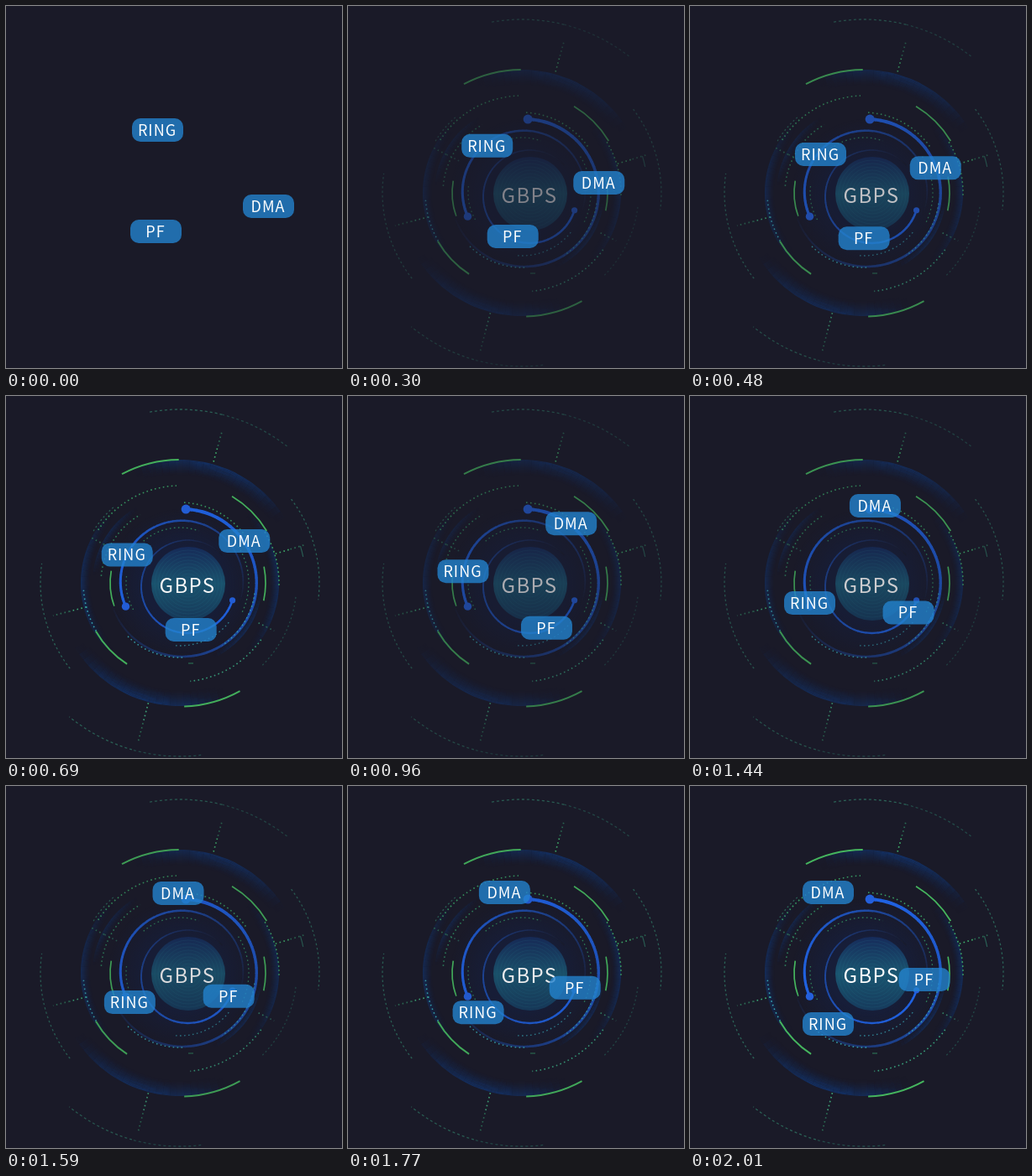
These frames come from a looping animation (400 by 432 pixels, 2.67 s). An HTML page:

```html
<!DOCTYPE html>
<html lang="en">
<head>
<meta charset="utf-8">
<title>GBPS dial</title>
<style>
  html, body { margin: 0; width: 100%; height: 100%; overflow: hidden; background: #1a1a28; }
  body { position: relative; font-family: "Noto Sans CJK SC", "Noto Sans CJK JP", "Noto Sans CJK", "Noto Sans", sans-serif; }

  #dial {
    position: absolute; left: 0; top: 0; width: 400px; height: 432px;
    animation: pulse 2670ms infinite;
  }
  .chip {
    position: absolute; left: 0; top: 0; width: 61px; height: 28px;
    border-radius: 10px; background: rgba(35, 131, 205, .8);
    color: #fff; font-size: 18px; line-height: 27px; letter-spacing: 1px; text-indent: -1px;
    text-align: center; white-space: nowrap;
    offset-rotate: 0deg; offset-anchor: 50% 50%;
    animation: travel 2670ms infinite;
  }

  /* Everything advances in 30 ms steps, then rests until the loop restarts. */
  @keyframes pulse {
    0% { opacity: 0; animation-timing-function: steps(22); }
    24.719% { opacity: 1; animation-timing-function: steps(11); }
    37.079% { opacity: .6; animation-timing-function: steps(33); }
    74.157%, 100% { opacity: 1; }
  }
  @keyframes travel {
    0% { offset-distance: 0%; animation-timing-function: steps(66); }
    74.157%, 100% { offset-distance: 100%; }
  }
</style>
</head>
<body>
<svg id="dial" viewBox="0 0 400 432">
  <defs>
    <radialGradient id="halo" gradientUnits="userSpaceOnUse" cx="211" cy="224" r="90">
      <stop offset=".5" stop-color="#14224a" stop-opacity=".5"/>
      <stop offset="1" stop-color="#14224a" stop-opacity="0"/>
    </radialGradient>
    <linearGradient id="core" x1="0" y1="0" x2="0" y2="1">
      <stop offset="0" stop-color="#162b5a"/>
      <stop offset=".5" stop-color="#1a5570"/>
      <stop offset="1" stop-color="#163a5c"/>
    </linearGradient>
  </defs>
</svg>
<div class="chip" id="ring">RING</div>
<div class="chip" id="dma">DMA</div>
<div class="chip" id="pf">PF</div>

<script>
const dial = document.getElementById('dial');
const CX = 207, CY = 223;
const BG = [26, 26, 40];

function add(tag, attrs) {
  const el = document.createElementNS('http://www.w3.org/2000/svg', tag);
  for (const key in attrs) el.setAttribute(key, attrs[key]);
  dial.appendChild(el);
  return el;
}

function polar(r, deg, cx = CX, cy = CY) {
  const a = deg * Math.PI / 180;
  return [cx + r * Math.cos(a), cy + r * Math.sin(a)].map(v => +v.toFixed(2));
}

function arcPath(r, from, to, cx, cy) {
  const large = Math.abs(to - from) > 180 ? 1 : 0;
  return `M${polar(r, from, cx, cy)}A${r} ${r} 0 ${large} ${to > from ? 1 : 0} ${polar(r, to, cx, cy)}`;
}

function arc(r, from, to, stroke, width, dash = 'none', opacity = 1) {
  add('path', {
    d: arcPath(r, from, to), fill: 'none', stroke, 'stroke-width': width,
    'stroke-dasharray': dash, 'stroke-opacity': opacity.toFixed(3)
  });
}

function dots(r, from, to, stroke = '#389a62', width = 1.6) {
  arc(r, from, to, stroke, width, '1.6 3.4');
}

function spoke(angle, r0, r1, near, far) {
  const mid = r0 + (r1 - r0) * .5;
  [[r0, mid, near], [mid, r1, far]].forEach(([a, b, stroke]) => {
    const [x1, y1] = polar(a, angle), [x2, y2] = polar(b, angle);
    add('line', { x1, y1, x2, y2, stroke, 'stroke-width': 1.7, 'stroke-dasharray': '1.6 3.4' });
  });
}

// Band that fades inwards and towards both ends.
function glow(r, from, to, depth, strength) {
  const n = 24, step = (to - from) / n;
  for (let inset = .5; inset < depth; inset++) {
    const fade = strength * (1 - inset / depth) ** 1.5;
    for (let i = 0; i < n; i++) {
      const a = from + step * i;
      arc(r - inset, a, a + step, '#10408c', 1.1, 'none', fade * Math.sin(Math.PI * (i + .5) / n));
    }
  }
}

function mix(color, k) {
  return `rgb(${color.map((c, i) => Math.round(BG[i] + (c - BG[i]) * k))})`;
}

// Comet: a ball whose ring tail thins out and fades.
function comet(cx, cy, r, from, sweep, width, ball) {
  const n = 60, blue = [32, 98, 226];
  for (let i = n - 1; i >= 0; i--) {
    const k = i / n, a = from + sweep * k;
    add('path', {
      d: arcPath(r, a, a + sweep / n * 1.15, cx, cy), fill: 'none',
      stroke: mix(blue, 1 - k ** 1.6),
      'stroke-width': (width * (1 - k * .5)).toFixed(2)
    });
  }
  const [x, y] = polar(r, from, cx, cy);
  add('circle', { cx: x, cy: y, r: ball, fill: '#2460dc' });
}

// Soft bands
add('circle', { cx: 211, cy: 224, r: 90, fill: 'url(#halo)' });
glow(147, -112, -32, 20, .6);
glow(147, 68, 148, 20, .6);
glow(118, 135, 225, 12, .5);
glow(118, -45, 45, 12, .5);
glow(104, 185, 240, 10, .35);
glow(98, 5, 65, 10, .45);

// Outer dashed circles
const DIM = '#2b6357', FAINT = '#234a48';
arc(207, -100, -76, DIM, 1.3, '3 3');
arc(207, -76, -52, FAINT, 1.3, '3 3');
arc(207, 83, 106, FAINT, 1.3, '3 3');
arc(207, 106, 129.5, DIM, 1.3, '3 3');
arc(166, -37, 7, DIM, 1.3, '2.5 3');
arc(166, 142, 188, DIM, 1.3, '2.5 3');
arc(139, 7, 45, FAINT, 1.3, '2 3');
arc(120, 211, 229, DIM, 1.3, '2 3');
arc(150, -17, -12, DIM, 1.2);

// Spokes
spoke(-74.5, 150, 189, '#40b06c', '#2c6c54');
spoke(104.7, 148, 198, '#40a67a', '#2c6c54');
spoke(165.5, 115, 156, '#40ae7a', '#2c6c54');
spoke(-17, 119, 156, '#40b06c', '#2c6c54');
spoke(27, 105, 126, '#338066', '#2a5c54');
spoke(207, 84, 118, '#2a5c54', '#2c6c54');

// Dotted arcs
dots(116, 213, 268);
dots(94, 185, 240, '#2f805c');
dots(96, -87, -35);
dots(118, -31, 2, '#3fae6a');
dots(115, 150, 176, '#36a4b4');
dots(118, 35, 84, '#389e7a');
dots(66, 229, 290, '#2f855c', 1.3);
dots(64, 150, 187, '#2f805c', 1.3);
dots(75, 39, 95, '#308494', 1.3);
dots(82, -32, 25, '#30855e', 1.3);

// Solid green arcs
const GREEN = '#45b55e';
arc(147, -118, -90.5, GREEN, 2);
arc(147.5, 88, 61, GREEN, 2);
arc(120.5, -59, -31, GREEN, 1.8);
arc(115.5, 150, 123, GREEN, 2);
arc(83, 190, 160.5, GREEN, 1.7);
arc(102, -11, 12, GREEN, 1.7);
add('line', { x1: 217, y1: 319, x2: 223, y2: 319, stroke: '#2f805c' });

// Rings, with the dots that ride on the largest one
comet(210.3, 223, 88, -87.5, 250, 4, 5.5);
comet(209.3, 221.7, 73, 156.2, 225, 3.2, 4.7);
comet(216.5, 227.5, 55.5, 17, 300, 2.6, 3.6);
dots(89, 88, 135, '#36a0ac', 1.4);
dots(90, 8, 56, '#36a0ac', 1.4);

// Core
add('circle', { cx: 217, cy: 224, r: 44, fill: 'url(#core)' });
for (let r = 8; r < 44; r += 4) {
  add('circle', { cx: 217, cy: 224, r, fill: 'none', stroke: '#2a7f92', 'stroke-opacity': .2, 'stroke-width': .8 });
}
add('text', { x: 182.6, y: 235, fill: '#fff', 'font-size': 24, 'letter-spacing': 1.3 }).textContent = 'GBPS';

// Smooth curve through the waypoints of a chip
function route(points) {
  let d = `M${points[0]}`;
  for (let i = 0; i < points.length - 1; i++) {
    const p = points[i], q = points[i + 1];
    const before = points[i - 1] || p, after = points[i + 2] || q;
    const c1 = p.map((v, j) => (v + (q[j] - before[j]) / 6).toFixed(2));
    const c2 = q.map((v, j) => (v - (after[j] - p[j]) / 6).toFixed(2));
    d += `C${c1} ${c2} ${q}`;
  }
  return d;
}

const routes = {
  ring: [[180.5, 148], [166, 166.5], [144.5, 189], [137, 209], [142.5, 247], [155, 270], [164.5, 284]],
  dma: [[312.5, 239], [299, 211.5], [284, 173.5], [265.5, 152], [220.5, 131], [186.5, 127], [164.5, 127]],
  pf: [[178.5, 269], [196.5, 275], [220.5, 279], [237, 276.5], [260, 258.5], [270, 241], [279, 231]]
};
for (const id in routes) {
  document.getElementById(id).style.offsetPath = `path("${route(routes[id])}")`;
}
</script>
</body>
</html>
```
